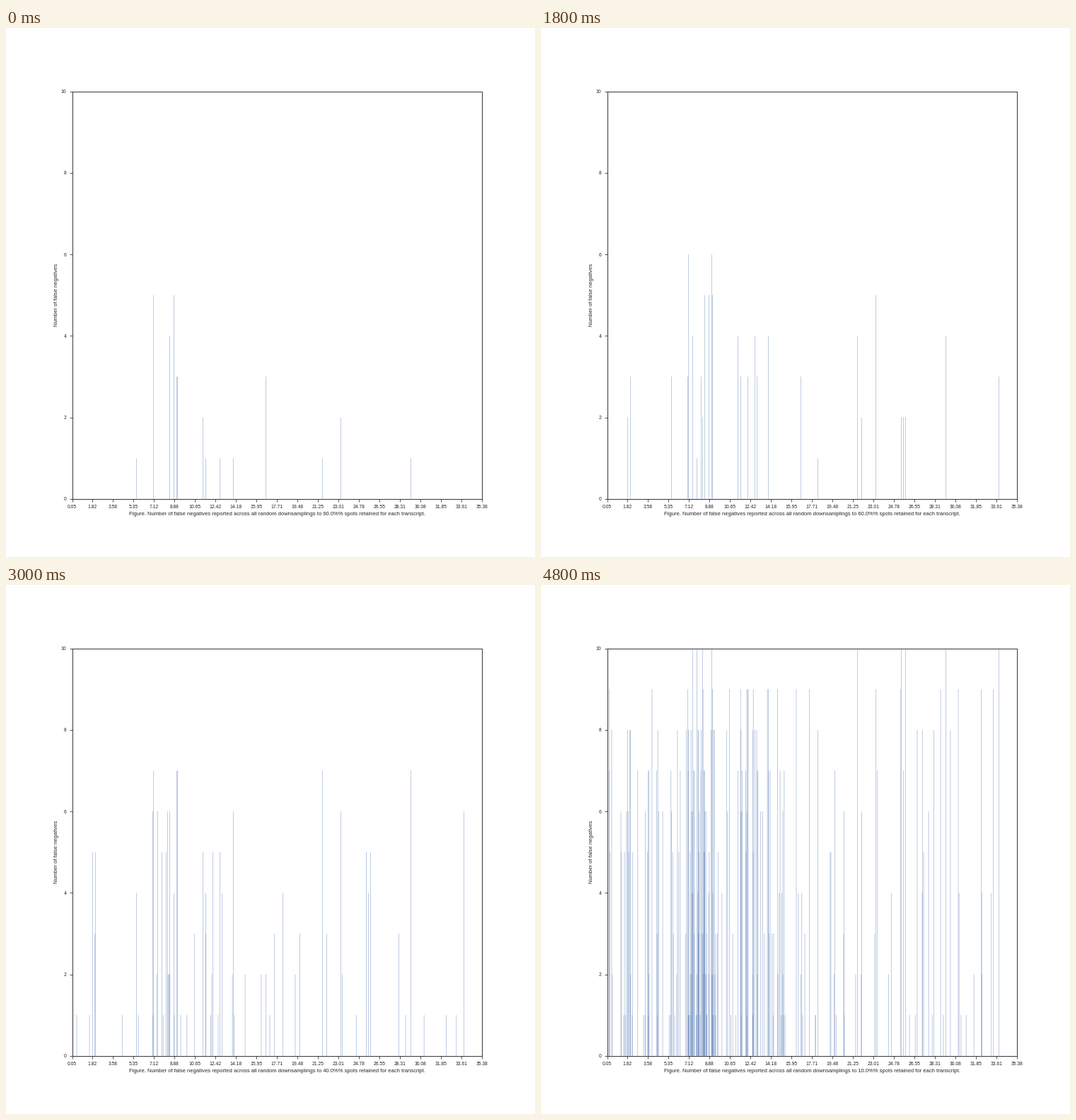
Recreate the animation shown at these times as a matplotlib script. Size 748x748 px, loop 5400 ms.

```python
import numpy as np
import matplotlib.pyplot as plt
from matplotlib.animation import FuncAnimation
from matplotlib.collections import LineCollection

SIZE, DPI, STEPS = 748, 44, 9
PIXEL = 72 / DPI
LEFT, RIGHT = 0.125 * SIZE, 0.9 * SIZE
INK = "#262626"
BLUE = (0.298, 0.447, 0.690, 0.36)

# Main spikes: column, height on the first step, height on the last step.
# A negative start delays the spike until its line rises above zero.
PEAKS = [
    (184, 1, 6), (208, 5, 8), (231, 4, 7), (237, 5, 4), (241, 3, 10),
    (242, 3, 9), (278, 2, 7), (282, 1, 6), (302, 1, 8), (321, 1, 9),
    (367, 3, 2), (447, 1, 10), (473, 2, 9), (572, 1, 10),
    (126, 0, 8), (207, 0, 9), (214, 0, 10), (226, 0, 8), (305, 0, 7),
    (122, -1, 8), (292, -1, 9), (453, -1, 6), (512, -1, 7), (647, -1, 10),
    (228, -2, 10), (391, -3, 8), (509, -3, 10), (515, -3, 10),
    (220, -4, 10), (415, -4, 7), (379, -6, 9), (555, -6, 8),
]


def make_crowd(rng):
    """Lesser spikes, densest around the most common expression values."""
    x = np.concatenate([rng.uniform(lo, hi, n) for lo, hi, n in
                        [(96, 206, 45), (207, 248, 55),
                         (249, 347, 50), (355, 648, 42)]])
    end = np.ceil(9 * rng.random(x.size) ** 1.3)
    onset = rng.uniform(3.5, 7.6, x.size)
    start = -end * onset / (STEPS - 1 - onset)
    return x, start, end


peak_x, peak_start, peak_end = np.array(PEAKS, float).T
crowd_x, crowd_start, crowd_end = make_crowd(np.random.default_rng(7))
xs = np.concatenate([peak_x + 0.5, crowd_x])
starts = np.concatenate([peak_start, crowd_start])
ends = np.concatenate([peak_end, crowd_end])

plt.rcParams.update({
    "font.family": "Liberation Sans", "text.color": INK,
    "axes.edgecolor": INK, "axes.labelcolor": INK, "axes.linewidth": 1.5,
    "xtick.color": INK, "ytick.color": INK,
})
fig = plt.figure(figsize=(SIZE / DPI, SIZE / DPI), dpi=DPI, facecolor="white")
ax = fig.add_axes([0.125, 0.11, 0.775, 0.77])
ax.set_xlim(LEFT, RIGHT)
ax.set_ylim(0, 10)
ax.set_xticks(np.linspace(LEFT, RIGHT, 21),
              [f"{v:.2f}" for v in np.linspace(0.05, 35.379, 21)])
ax.set_yticks(range(0, 11, 2))
ax.tick_params(length=6, width=1.25, pad=7, labelsize=11)
ax.tick_params(axis="x", pad=8)
ax.set_ylabel("Number of false negatives", fontsize=12.5)
caption = ax.set_xlabel("", fontsize=12.5)

spikes = LineCollection([], linewidths=PIXEL, colors=[BLUE],
                        capstyle="butt", zorder=1)
spikes.set_snap(False)
ax.add_collection(spikes, autolim=False)


def draw(step):
    heights = np.round(starts + (ends - starts) * step / (STEPS - 1))
    spikes.set_segments([[(x, 0), (x, h)]
                         for x, h in zip(xs, heights) if h > 0])
    caption.set_text("Figure. Number of false negatives reported across all "
                     f"random downsamplings to {90 - 10 * step:.1f}%% spots "
                     "retained for each transcript.")
    return spikes, caption


anim = FuncAnimation(fig, draw, frames=STEPS, interval=600,
                     repeat=True, repeat_delay=0, blit=False)
plt.show()
```
